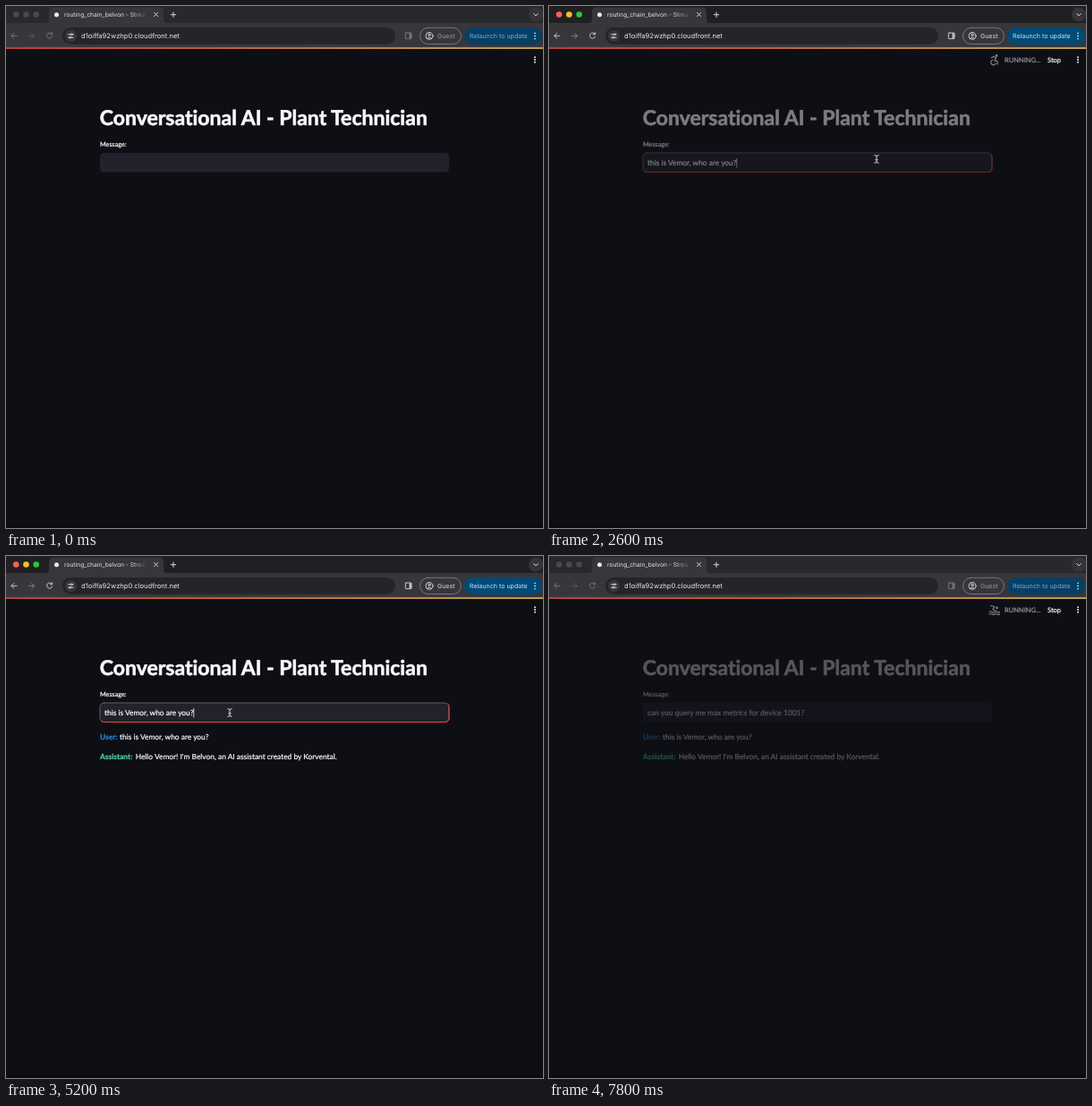
Write an HTML page that moves like this. It is 600 px wide and 583 px high and loops after 8 s.

```html
<!DOCTYPE html>
<html lang="en">
<head>
<meta charset="utf-8">
<title>Chat demo</title>
<style>
  html, body { margin: 0; width: 100%; height: 100%; overflow: hidden; background: #0e0f14; }
  svg { display: block; width: 100%; height: 100%; }
  text { white-space: pre; text-rendering: geometricPrecision; font-variant-ligatures: none; }
  .ui { font-family: Inter, Roboto, sans-serif; }
  .page { font-family: Lato, "Open Sans", sans-serif; font-size: 8.4px; color: #f8f9fb; }
  .page text { fill: currentColor; stroke: currentColor; stroke-width: .22px; }
  .page .title { stroke-width: .6px; }
  .bold { font-weight: 700; }
  .line { fill: none; stroke-linecap: round; stroke-linejoin: round; }
  .strip { fill: #202023; }
  .icons { stroke: #c9c8cc; }
  .label { fill: #dddce0; }
  .pill { fill: #004a77; }
  .pillText { fill: #c2e7ff; }
  .pillDots { stroke: #c2e7ff; }
  .light { fill: var(--c); }
  .inactive .strip { fill: #29282b; }
  .inactive .icons { stroke: #77767a; }
  .inactive .label { fill: #99989c; }
  .inactive .pill { fill: #073f66; }
  .inactive .pillText { fill: #7fa9c6; }
  .inactive .light { fill: #49484c; }
</style>
</head>
<body>
<svg viewBox="0 0 600 583" preserveAspectRatio="none">
  <defs>
    <linearGradient id="rainbow">
      <stop offset="0" stop-color="#ee4a4c"/>
      <stop offset=".35" stop-color="#f0704c"/>
      <stop offset=".7" stop-color="#efa950"/>
      <stop offset="1" stop-color="#f0cb62"/>
    </linearGradient>
    <linearGradient id="tabFade" gradientUnits="userSpaceOnUse" x1="140" x2="158" y1="0" y2="0">
      <stop stop-color="#e4e3e7"/>
      <stop offset="1" stop-color="#e4e3e7" stop-opacity="0"/>
    </linearGradient>
  </defs>

  <rect width="600" height="583" fill="#0e0f14"/>
  <rect y="580" width="600" height="3" fill="#0a0b0f"/>

  <g id="chrome" class="ui">
    <rect class="strip" width="600" height="20"/>
    <rect y="19" width="600" height="27" fill="#38363a"/>
    <rect y="45.700" width="600" height=".6" fill="#4a484c"/>
    <path d="M43 19.500q5 0 5-5V6.500q0-5 5-5H171q5 0 5 5V14.500q0 5 5 5z" fill="#38363a"/>
    <circle class="light" style="--c:#fe5f57" cx="11.300" cy="9.500" r="3.300"/>
    <circle class="light" style="--c:#febc2e" cx="22.500" cy="9.500" r="3.300"/>
    <circle class="light" style="--c:#28c840" cx="33.700" cy="9.500" r="3.300"/>
    <circle cx="56.500" cy="9.800" r="2.500" fill="#ecebef"/>
    <text x="65" y="12.100" font-size="6.700" fill="url(#tabFade)">routing_chain_belvon - Strea</text>
    <path class="line" stroke="#d8d7db" d="M165.500 7.500l4 4m0-4l-4 4M184.300 9.700h5.400m-2.700-2.700v5.400"/>
    <circle cx="592" cy="9.500" r="8" fill="#353438"/>
    <path class="line" stroke="#e0dfe3" d="M589.700 8.600l2.300 2.300 2.300-2.300"/>

    <g class="line icons">
      <path d="M12 33.300H6m2.800-2.800L6 33.300l2.800 2.800"/>
      <path opacity=".5" d="M25.500 33.300h6m-2.800-2.800l2.800 2.800-2.800 2.800"/>
      <path d="M51.200 31.200a3.100 3.100 0 1 0 .4 3M51.600 29.800v2h-2"/>
      <rect x="446.300" y="30" width="6.800" height="6.600" rx=".7"/>
      <path stroke-width="2.200" d="M451.700 31v4.600"/>
    </g>

    <rect x="63" y="24" width="372" height="18.800" rx="9.400" fill="#252428"/>
    <circle cx="72.500" cy="33.400" r="6.700" fill="#38363a"/>
    <g class="line" stroke="#dddce0">
      <path d="M69.800 31.700h2m2.700 0h.6M69.800 35.200h.6m2.600 0h2.100"/>
      <circle cx="73.400" cy="31.700" r=".9"/>
      <circle cx="71.600" cy="35.200" r=".9"/>
    </g>
    <text x="84" y="36" font-size="7.600" fill="#e9e8ec">d1oiffa92wzhp0.cloudfront.net</text>

    <rect class="line" x="462.500" y="24.300" width="46" height="18.200" rx="9.100" stroke="#7d7c80" stroke-width=".9"/>
    <g class="line" stroke="#dddce0" stroke-width=".9">
      <circle cx="473" cy="33.400" r="4"/>
      <circle cx="473" cy="32.300" r="1.300"/>
      <path d="M470.400 36.200q2.600-2.200 5.200 0"/>
    </g>
    <text class="label" x="482" y="36" font-size="7">Guest</text>
    <rect class="pill" x="512" y="24" width="87" height="19" rx="9.500"/>
    <text class="pillText" x="518" y="36" font-size="7.100">Relaunch to update</text>
    <path class="line pillDots" stroke-width="1.700" d="M591 30.300v.01m0 3.100v.01m0 3.100v.01"/>
  </g>

  <rect y="46.300" width="600" height="1.500" fill="url(#rainbow)"/>
  <path class="line" stroke="#f4f4f7" stroke-width="1.900" d="M591 57.200v.01m0 2.800v.01m0 2.800v.01"/>

  <g id="status" class="page">
    <g id="wheelchair" class="line" stroke="#85868b" stroke-width="1.200">
      <circle cx="500" cy="55.500" r=".8"/>
      <path d="M494.500 57.800l2.300-1.500 2.700 1.600-1.700 3.100 3.200.8.300 3.200"/>
      <path d="M495.600 60.200a2.900 2.900 0 1 0 3.600 4"/>
    </g>
    <g id="swimmer" class="line" stroke="#85868b" stroke-width="1.100">
      <circle cx="500.500" cy="57.800" r=".8"/>
      <path d="M493.500 55.500l4.500 1.200-2.200 3 3.600 1.200"/>
      <path d="M492 62.500q1.500-1 3 0t3 0 3 0 2.500 0M492 65q1.500-1 3 0t3 0 3 0 2.500 0"/>
    </g>
    <text x="509" y="62.600" font-size="7.500" color="#96979c">RUNNING...</text>
    <text x="557" y="62.600" font-size="7.500">Stop</text>
  </g>

  <g id="content" class="page">
    <text class="bold title" x="104.800" y="133.200" font-size="23">Conversational AI - Plant Technician</text>
    <text x="105" y="156.800" font-size="7.250">Message:</text>
    <rect x="105" y="164" width="390" height="21.500" rx="4.500" fill="#21222b"/>
    <g id="focus" class="line">
      <rect x="105" y="164" width="390" height="21.500" rx="4.500" stroke="#5c5c65"/>
      <path stroke="#e0474b" d="M106.500 184.300q1.300 1.200 3 1.200H490.500q4.500 0 4.500-4.500V168.500q0-2-1.200-3.200"/>
      <path id="caret" stroke="#fff" stroke-width=".8" d="M0 170.500v9.500"/>
    </g>
    <text id="input" x="110" y="177.900"></text>
    <text id="hint" x="436" y="183" font-size="6.400" color="#96979d">Press Enter to apply</text>
    <g id="reply">
      <text class="bold" x="105" y="204.600" color="#2287e2">User:</text>
      <text id="asked" x="127" y="204.600"></text>
      <text class="bold" x="105" y="227.400" color="#54d0a4">Assistant:</text>
      <text x="144.700" y="227.400">Hello Vemor! I'm Belvon, an AI assistant created by Korvental.</text>
    </g>
  </g>

  <g id="mouse">
    <path id="arrow" d="M0 0v8.300l1.900-1.700 1.400 3.100 1.500-.7-1.400-3h2.500z" fill="#101014" stroke="#f2f2f4" stroke-width=".8" stroke-linejoin="round"/>
    <path id="beam" class="line" stroke="#d5d5d8" d="M-2.200-4.300q1.600 0 2.200 1 .6-1 2.200-1M0-3.300v6.600M-2.200 4.300q1.600 0 2.200-1 .6 1 2.200 1M-1.200.8h2.400"/>
  </g>
</svg>

<script>
  const LOOP = 8000, STEP = 200;
  const QUESTION = "this is Vemor, who are you?";
  const QUERY = "can you query me max metrics for device 1001?";
  // time, x, y of the pointer
  const PATH = [
    [400, 300, 196], [600, 272, 178], [1000, 257, 197], [1200, 257, 204.500],
    [1800, 263, 209], [2600, 366, 171], [3000, 380, 260], [3600, 406.500, 397.500],
    [4400, 406.500, 397.500], [5000, 250, 175], [5800, 250, 175],
    [6400, 400, 225], [6600, 405.500, 238], [7000, 404, 261]
  ];

  const $ = id => document.getElementById(id);
  const show = (id, on) => $(id).style.display = on ? "" : "none";
  const within = (t, from, to) => t >= from && t < to;
  const progress = (t, from, to) => Math.min(1, Math.max(0, (t - from) / (to - from)));
  const typed = (text, t, from, to) => text.slice(0, Math.round(text.length * progress(t, from, to)));

  function pointerAt(t) {
    const next = PATH.findIndex(p => p[0] > t);
    if (next < 0) return PATH.at(-1).slice(1);
    const a = PATH[Math.max(0, next - 1)], b = PATH[next];
    const k = progress(t, a[0], b[0]);
    return [a[1] + (b[1] - a[1]) * k, a[2] + (b[2] - a[2]) * k];
  }

  function fade(t) {
    if (within(t, 1600, 3800)) return 1 - 0.7 * progress(t, 1600, 2800) ** 1.5;
    if (t >= 6800) return 1 - 0.7 * progress(t, 6800, 7600) ** 1.5;
    return 1;
  }

  function render(t) {
    const active = within(t, 200, 3000) || within(t, 4600, 7000);
    const focused = within(t, 400, 3000) || within(t, 4800, 7000);
    const running = within(t, 1600, 3800) || t >= 6800;
    const wheels = Math.floor(t / (2 * STEP)) % 2 === 0;

    $("chrome").classList.toggle("inactive", !active);
    $("input").textContent = t < 5800 ? typed(QUESTION, t, 400, 1200) : typed(QUERY, t, 5700, 6500);
    $("content").style.opacity = fade(t);
    show("focus", focused);
    show("caret", t < 6600);
    show("hint", within(t, 600, 1600) || within(t, 5800, 6800));
    show("reply", t >= 3800);
    show("status", running);
    show("wheelchair", wheels);
    show("swimmer", !wheels);

    const caretX = 110.300 + $("input").getComputedTextLength();
    $("caret").setAttribute("transform", `translate(${caretX})`);

    const [x, y] = pointerAt(t);
    const overInput = within(x, 105, 495) && within(y, 164, 186);
    $("mouse").setAttribute("transform", `translate(${x} ${y})`);
    show("mouse", within(t, 400, 7200));
    show("beam", overInput);
    show("arrow", !overInput);
  }

  $("asked").textContent = QUESTION;
  const start = performance.now();
  let last = -1;
  function tick() {
    const t = Math.floor(((performance.now() - start) % LOOP) / STEP) * STEP;
    if (t !== last) render(last = t);
    requestAnimationFrame(tick);
  }
  tick();
</script>
</body>
</html>
```
